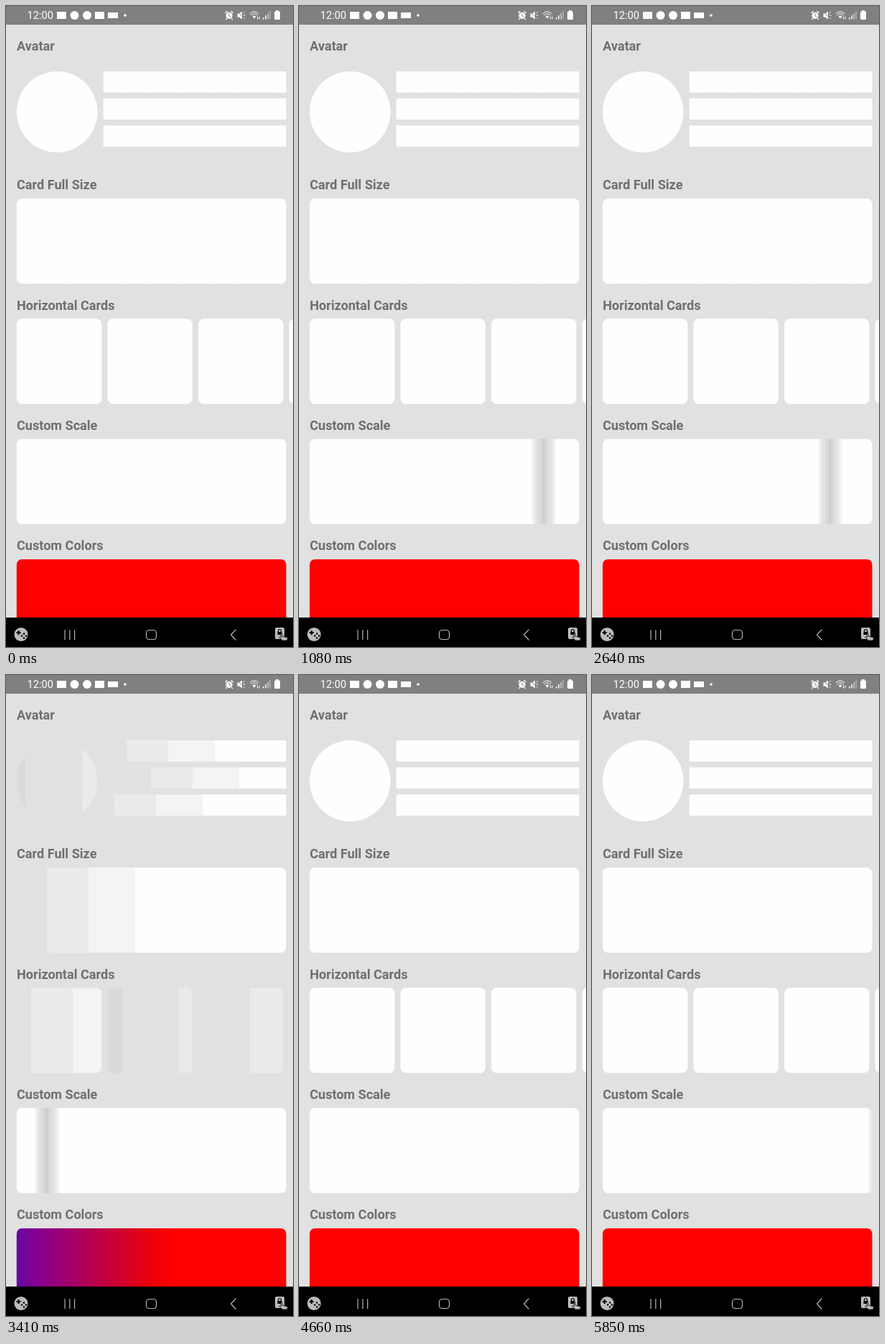
Animation of 400x892 px, one loop 5950 ms. Source, as an HTML page:

```html
<!DOCTYPE html>
<html lang="en">
<head>
<meta charset="utf-8">
<title>Shimmer placeholders</title>
<style>
  html, body { margin: 0; width: 100%; height: 100%; overflow: hidden; background: #e1e1e1; }
  svg { display: block; width: 400px; height: 892px; }
  text { font-family: Roboto, sans-serif; }
  #titles { font-size: 18.1px; font-weight: 700; fill: #6f6f6f; }
  .line { fill: none; stroke-linecap: round; stroke-linejoin: round; }
</style>
</head>
<body>
<svg viewBox="0 0 400 892">
  <defs id="defs">
    <linearGradient id="grey" gradientUnits="userSpaceOnUse" x2="400" spreadMethod="reflect"></linearGradient>
    <linearGradient id="colour" gradientUnits="userSpaceOnUse" x1="0" x2="380"></linearGradient>
  </defs>

  <rect width="400" height="892" fill="#e1e1e1"/>
  <g id="boxes"></g>
  <g id="titles"></g>

  <!-- status bar -->
  <rect width="400" height="26" fill="#808080"/>
  <g fill="#fff">
    <text x="29.5" y="18" font-size="14.6">12:00</text>
    <rect x="71" y="8" width="13" height="10"/>
    <circle cx="95.5" cy="13" r="6"/>
    <circle cx="113" cy="13" r="6"/>
    <rect x="124" y="8" width="13" height="10"/>
    <rect x="142" y="9" width="14" height="8"/>
    <circle cx="166" cy="13" r="1.8"/>
    <circle cx="311" cy="13.3" r="4.6"/>
    <path d="M322.500 10.500h2.500l4-3v11l-4-3h-2.500z"/>
    <rect x="374" y="7.500" width="8" height="11.500" rx="1.500"/>
    <rect x="376" y="6" width="4" height="2"/>
    <path d="M358 16h1.500v2.500h-1.500zM361.300 13h1.500v5.500h-1.500z"/>
    <path d="M364.500 10h1.500v8.500h-1.500zM367.500 7h1v11.500h-1z" opacity=".6"/>
    <path d="M343.500 14.500a4 4 0 0 1 5 0l-2.500 3z"/>
  </g>
  <g class="line" stroke="#fff">
    <path d="M306 9.500l2-2M316 9.500l-2-2M307.500 17.500l-1 1M314.500 17.500l1 1" stroke-width="1.400"/>
    <path d="M331 10l1.500-1.500M331 13h2M331 16l1.500 1.500M340 10.500q6-5.500 12 0M341.500 12.700q4.500-4 9 0M350.500 18v-3M353 15v3"/>
    <path d="M311 10.700v3l2 1M323 7.500l9 10.500" stroke="#808080"/>
  </g>

  <!-- navigation bar -->
  <rect y="851" width="400" height="41"/>
  <g class="line" stroke="#b4b4b4" stroke-width="1.200">
    <path d="M82 868.500v13M88.800 868.500v13M95.600 868.500v13M320 868l-6.500 7 6.500 7"/>
    <rect x="195.500" y="868.500" width="14" height="13" rx="4"/>
  </g>
  <circle cx="21" cy="874.500" r="9.500" fill="#bbb"/>
  <path d="M17.500 869v6M14.500 872h6" stroke="#000" stroke-width="2.200"/>
  <path class="line" d="M25 873.500h0M22 876.500h0M28 876.500h0M25 879.500h0" stroke="#000" stroke-width="2.600"/>
  <rect x="375" y="865" width="13" height="16" rx="2" fill="#bbb"/>
  <path class="line" d="M379.500 871v-1.500a2 2 0 0 1 4 0v1.500" stroke="#000" stroke-width="1.200"/>
  <rect x="378.500" y="871" width="6" height="4"/>
  <path d="M383 874a1 1 0 0 1 2 0v3l6 1.500q2 .5 1.500 2l-1 2.500h-6l-5-4.500 1-1 2 1z" fill="#bbb" stroke="#000" stroke-width=".8"/>
</svg>

<script>
const $ = id => document.getElementById(id);

function add(parent, tag, attrs) {
  const node = document.createElementNS("http://www.w3.org/2000/svg", tag);
  for (const key in attrs) node.setAttribute(key, attrs[key]);
  return parent.appendChild(node);
}

// Mirrors stops given as [distance from the middle, colour]
function fillGradient(id, reach, stops) {
  const gradient = $(id);
  gradient.setAttribute("x1", -reach);
  gradient.setAttribute("x2", reach);
  gradient.setAttribute("spreadMethod", "pad");
  const mirrored = stops.map(([d, color]) => [-d, color]).reverse();
  for (const [d, color] of [...mirrored, ...stops])
    add(gradient, "stop", { offset: (d / reach + 1) / 2, "stop-color": color });
}

// Flat grey bands that brighten outwards
const edges = [0, 12, 62, 127, 206, 264, 329, 400];
fillGradient("grey", 400, edges.slice(1).flatMap((edge, k) => {
  const level = Math.floor(205 + 5.7 * k + 0.42 * k * k);
  const color = `rgb(${level},${level},${level})`;
  return [[edges[k], color], [edge, color]];
}));
fillGradient("colour", 380, [
  [25, "#002aff"], [65, "#0020e0"], [190, "#860090"], [350, "#ec0008"], [380, "#f00"]
]);

const LEFT = 14.8, FULL = 375.7, CARD = 118.5;
const rowTop = row => 268 + 167.3 * row;
const shimmers = [];

// centre: gradient middle when the sweep is at REF; speed: its travel per unit of sweep
const REF = 69;
function box(x, y, width, height, rx, centre, speed, kind = "grey", scale = 1) {
  const id = "fill" + shimmers.length;
  const fill = add($("defs"), "linearGradient", { id, href: "#" + kind });
  add($("boxes"), "rect", { x, y, width, height, rx, fill: `url(#${id})` });
  shimmers.push({ fill, centre, speed, scale });
}

box(LEFT, 91, 112.7, 112.7, 56.35, -50, 4.16);
[8, 42, -9].forEach((centre, i) => box(135.7, 91 + 37.6 * i, 254.8, 29.5, 1, centre, 3.85));
box(LEFT, rowTop(0), FULL, CARD, 7.5, -98, 4.25);
[-125, 81, 180, 306].forEach((centre, i) =>
  box(LEFT + 126.6 * i, rowTop(1), CARD, CARD, 7.5, centre, 3.85));
box(LEFT, rowTop(2), FULL, CARD, 7.5, REF, 1, "grey", 0.0515);
box(LEFT, rowTop(3), FULL, CARD, 7.5, -95, 4.28, "colour");

["Avatar", "Card Full Size", "Horizontal Cards", "Custom Scale", "Custom Colors"].forEach((title, i) => {
  const y = i ? rowTop(i - 1) - 12.6 : 62;
  add($("titles"), "text", { x: 15, y }).textContent = title;
});

// Each sweep: time at which its position is zero, and phase of its ticks
const LOOP = 5950, TICK = 60, SPEED = 0.365, LEAD = 150;
const sweeps = [[146, 0], [1731, 0], [3244, 40], [4749, 30]];

function draw(time) {
  const [zero, phase] = sweeps.filter(s => time >= s[0] - LEAD).pop();
  const tick = Math.floor((time - phase) / TICK) * TICK + phase;
  const position = (tick - zero) * SPEED;
  for (const { fill, centre, speed, scale } of shimmers) {
    const x = centre + speed * (position - REF);
    fill.setAttribute("gradientTransform", `translate(${x.toFixed(2)}) scale(${scale} 1)`);
  }
}

const start = performance.now();
function frame() {
  draw((performance.now() - start) % LOOP);
  requestAnimationFrame(frame);
}
frame();
</script>
</body>
</html>
```
